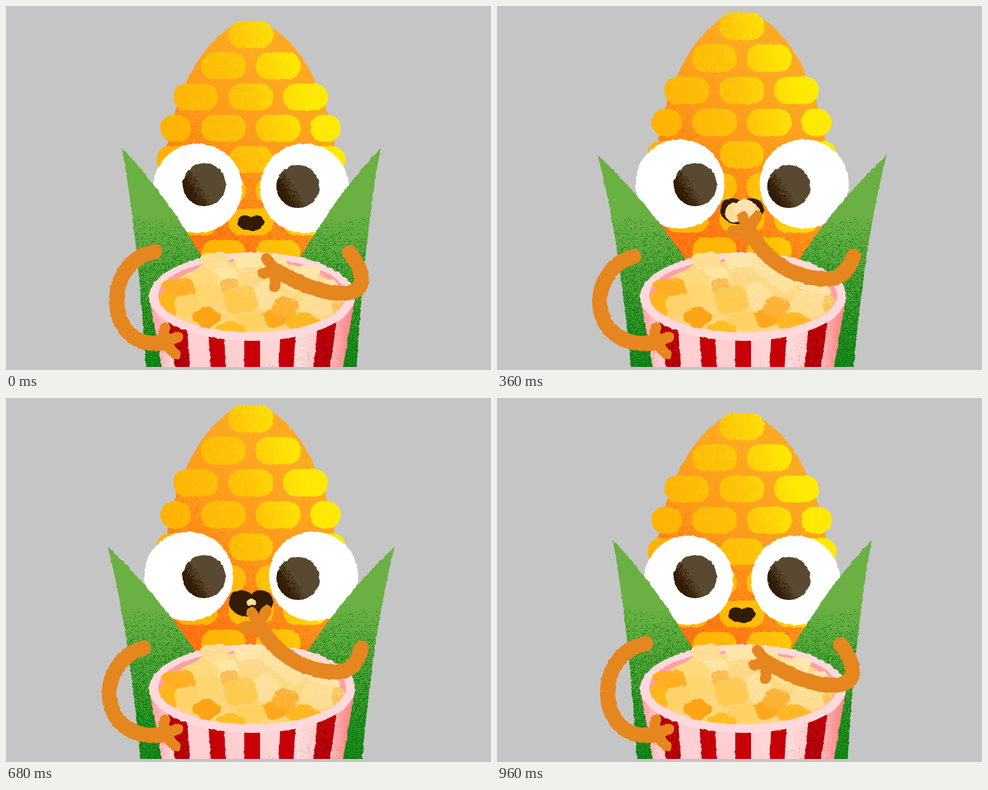
Recreate the animation shown at these times as an HTML page with a canvas. Size 800 by 600 pixels, loop 1000 ms.

```html
<!DOCTYPE html>
<html lang="en">
<head>
<meta charset="utf-8">
<title>Corn eating popcorn</title>
<style>
html, body { margin: 0; width: 100%; height: 100%; overflow: hidden; background: #c5c5c5; }
canvas { display: block; filter: url(#rough); }
body::after { content: ""; position: absolute; left: 0; top: 595px; width: 800px; height: 5px; background: #c5c5c5; }
svg { position: absolute; }
</style>
</head>
<body>
<svg width="0" height="0">
  <filter id="rough" filterUnits="userSpaceOnUse" x="0" y="0" width="800" height="600" color-interpolation-filters="sRGB">
    <feTurbulence type="fractalNoise" baseFrequency=".15" seed="4" stitchTiles="stitch" x="0" y="0" width="160" height="120"/>
    <feTile result="noise"/>
    <feDisplacementMap in="SourceGraphic" in2="noise" scale="4" xChannelSelector="R" yChannelSelector="G"/>
  </filter>
</svg>
<canvas width="800" height="600"></canvas>
<script>
const canvas = document.querySelector('canvas');
const ctx = canvas.getContext('2d');
const LOOP = 1000, STEP = 40;

const clamp = v => Math.max(0, Math.min(1, v));
const mix = (a, b, k) => a + (b - a) * k;
const mixAll = (a, b, k) => a.map((v, i) => mix(v, b[i], k));

let seed = 7;
const rand = () => (seed = (seed * 1664525 + 1013904223) >>> 0) / 4294967296;

// Speckle layer: a dot of the colour appears with probability density(x, y).
function grain(w, h, [r, g, b], density) {
  const c = document.createElement('canvas');
  c.width = w;
  c.height = h;
  const cx = c.getContext('2d'), img = cx.createImageData(w, h);
  for (let i = 0; i < w * h; i++) {
    const on = rand() < density(i % w, Math.floor(i / w));
    img.data.set([r, g, b, on ? 255 : 0], i * 4);
  }
  cx.putImageData(img, 0, 0);
  return ctx.createPattern(c, 'no-repeat');
}

function gradient(x0, y0, x1, y1, ...stops) {
  const g = ctx.createLinearGradient(x0, y0, x1, y1);
  stops.forEach(([at, color]) => g.addColorStop(at, color));
  return g;
}

function paint(path, ...styles) {
  for (const s of styles) {
    ctx.fillStyle = s;
    ctx.fill(path);
  }
}

function ellipse(x, y, rx, ry = rx) {
  const p = new Path2D();
  p.ellipse(x, y, rx, ry, 0, 0, 7);
  return p;
}

const bodyFill = gradient(290, 420, 500, 150, [0, '#ff7a14'], [.6, '#fe981a'], [1, '#fdaa22']);
const bodyGrain = grain(800, 600, [255, 98, 14], (x, y) => clamp((y - 210) / 420 + (360 - x) / 450) * .75);
const kernelFill = gradient(270, 260, 510, 200, [0, '#ffb205'], [.6, '#ffc008'], [.8, '#ffd406'], [1, '#ffea00']);
const kernelGrain = grain(800, 600, [255, 228, 20], (x, y) => clamp((x - 300) / 300 + (170 - y) / 500) * .3);
const leafFill = gradient(0, 340, 0, 600, [0, '#6bb043'], [.6, '#4a9f35'], [1, '#259026']);
const leafGrain = grain(800, 600, [12, 126, 16], (x, y) => clamp((y - 345) / 270) * .8);
const pupilGrain = grain(80, 80, [50, 28, 3], (x, y) => clamp((40 - x + .6 * (y - 40) - 3) / 28));
const cupFill = gradient(236, 0, 576, 0, [0, '#ff9fa3'], [.1, '#ffd0d3'], [.5, '#ffced1'],
  [.72, '#ffdcdc'], [.88, '#ffc0c0'], [.95, '#ff9292'], [1, '#ff8686']);
const cupGrain = grain(800, 600, [255, 128, 128], (x, y) =>
  clamp((x - 460) / 400 + (y - 570) / 250) * .5 + clamp((270 - x) / 90) * .5);
const stripeGrain = grain(800, 600, [130, 0, 14], (x, y) => clamp(Math.abs(x - 406) / 110 - .5) * clamp((y - 480) / 130) * .7);
const cornGrain = grain(800, 600, [255, 238, 184], (x, y) =>
  clamp(.22 + (x - 430) / 600 - (y - 460) / 170) * .6);

const body = new Path2D('M404 25C470 25 548 150 548 300V430H260V300C260 150 338 25 404 25');

// Kernel rows: pairs of centre x and width.
const kernels = new Path2D();
[
  [404, 74], [359, 74, 449, 74], [313, 74, 404, 74, 494, 74],
  [280, 50, 359, 74, 449, 74, 527, 50], [285, 74, 404, 72, 523, 74],
  [359, 74, 449, 74], [313, 74, 404, 74, 494, 74], [359, 74, 449, 74]
].forEach((row, j) => {
  for (let i = 0; i < row.length; i += 2)
    kernels.roundRect(row[i] - row[i + 1] / 2, 25 + 51.5 * j, row[i + 1], 44, 21);
});

const cup = new Path2D('M236 479L258 600H555L576 479Z');
const stripes = new Path2D('M264 500L280 600H304L296 500ZM331 500L338 600H362L359 500Z' +
  'M393 500V600H419V500ZM454 500L450 600H474L480 500ZM517 500L507 600H534L548 500Z');
const bowlClip = new Path2D('M252 380H560V477A154 61 0 0 1 252 477Z');

// Popcorn in the bowl: x, y, width, height, colour.
const pieces = [
  [500, 440, 38, 28, '#ffe3a4'], [345, 422, 54, 36, '#ffd98c'], [402, 422, 56, 30, '#ffe4a4'],
  [440, 428, 50, 40, '#ffdf9a'], [475, 450, 56, 42, '#ffdf98'], [525, 466, 54, 34, '#ffe0a4'],
  [360, 446, 52, 34, '#ffe49e'], [408, 444, 44, 32, '#ffd480'], [325, 450, 50, 42, '#ffd978'],
  [333, 474, 48, 40, '#ffd670'], [285, 465, 60, 36, '#ffaf26'], [369, 461, 34, 28, '#ffba4c'],
  [515, 490, 66, 44, '#ffdc90'], [548, 492, 24, 34, '#ffc050'], [427, 477, 50, 46, '#ffe09a'],
  [266, 494, 40, 44, '#ffb71c'], [387, 484, 62, 50, '#ffca50'], [300, 494, 48, 42, '#ffd26a'],
  [442, 515, 56, 30, '#ffa81e'], [461, 497, 46, 38, '#ffb134'], [405, 520, 54, 32, '#ffd162'],
  [331, 513, 46, 36, '#ffa414'], [490, 522, 58, 34, '#ffb824'], [370, 532, 48, 26, '#ffbf24']
];

function popcorn(x, y, w, h, color) {
  const p = ellipse(x, y, w * .42, h * .42);
  for (let i = 0; i < 4; i++) {
    const a = i * 1.571 + .6 + x % 1.5, ex = x + Math.cos(a) * w * .24, ey = y + Math.sin(a) * h * .22;
    p.addPath(ellipse(ex, ey, w * .27, h * .29));
  }
  paint(p, color, cornGrain);
}

function drawCorn(p) {
  ctx.save();
  ctx.translate(0, 540);
  ctx.scale(1, 1 + .029 * p);
  ctx.translate(0, -540);
  paint(body, bodyFill, bodyGrain);
  paint(kernels, kernelFill, kernelGrain);
  ctx.restore();
}

function drawEye(x, y, px, py) {
  paint(ellipse(x, y, 73.5), '#fff');
  ctx.save();
  ctx.translate(px - 40, py - 40);
  paint(ellipse(40, 40, 35.5), '#594930', pupilGrain);
  ctx.restore();
}

function drawMouth(p, q) {
  const m = new Path2D('M-1-.1C-1-1.1-.35-1.25 0-.75C.35-1.25 1-1.1 1-.1C1 .65 .5 1 0 1C-.5 1-1 .65-1-.1');
  ctx.save();
  ctx.translate(404, mix(358, 337, Math.min(p, q)));
  ctx.scale(mix(21.5, 37, q), mix(12.5, 22, q));
  paint(m, '#331c00');
  ctx.restore();
}

function drawLeaf(p) {
  const [x, y, ox, bx, ix, iy, ex] =
    mixAll([191, 234, 218, 231, 262, 308, 322], [165, 246, 201, 221, 242, 318, 307], p);
  paint(new Path2D(`M${x} ${y}Q${ox} 380 ${bx} 600H400L${ex} 412Q${ix} ${iy} ${x} ${y}`), leafFill, leafGrain);
}

function drawLeaves(p) {
  drawLeaf(p);
  ctx.save();
  ctx.translate(809, 0);
  ctx.scale(-1, 1);
  drawLeaf(p);
  ctx.restore();
}

function drawBucket() {
  paint(cup, cupFill, cupGrain);
  paint(stripes, '#c80008', stripeGrain);
  paint(ellipse(406, 479, 170, 73), '#ffd9dc');
  paint(ellipse(406, 477, 155, 61), '#ffa0a6');
  ctx.save();
  ctx.clip(bowlClip);
  paint(ellipse(406, 484, 146, 64), '#ffd67c', cornGrain);
  pieces.forEach(a => popcorn(...a));
  ctx.restore();
}

function stroke(path, width) {
  ctx.lineWidth = width;
  ctx.stroke(path);
}

function finger(x, y, dx, dy) {
  stroke(new Path2D(`M${x} ${y}l${dx} ${dy}`), 18);
}

function drawArms(p) {
  ctx.strokeStyle = '#e6861f';
  ctx.lineCap = ctx.lineJoin = 'round';

  const [sx, sy, cx, cy] = mixAll([245, 405, 160, 420], [225, 413, 146, 435], p);
  stroke(new Path2D(`M${sx} ${sy}C${cx} ${cy} ${cx} 565 256 556`), 25);
  [[3, -23], [24, -8], [21, 20]].forEach(f => finger(259, 554, ...f));

  const a = mixAll(
    [567, 407, 583, 425, 600, 467, 568, 472, 535, 478, 495, 465, 447, 437],
    [589, 413, 580, 433, 568, 449, 543, 449, 495, 449, 445, 425, 413, 366], p);
  stroke(new Path2D(`M${a[0]} ${a[1]}C${a.slice(2)}`), 25);
  const turn = 1.36 * p;
  [[-2.28, 27], [3.0, 23], [1.72, 26]].forEach(([angle, len]) =>
    finger(a[12], a[13], len * Math.cos(angle + turn), len * Math.sin(angle + turn)));
}

// Piece carried to the mouth, then swallowed.
function drawBite(t, p) {
  if (t < 180 || t > 720) return;
  const k = t < 500 ? p : 1;
  const s = t < 600 ? 1 - .15 * clamp((t - 360) / 240) : .85 * (1 - (t - 600) / 120);
  const x = 419 - 14 * k, y = t < 500 ? 422 - 88 * k : mix(355, 334, p);
  ctx.save();
  ctx.translate(x, y);
  ctx.scale(s, s);
  paint(ellipse(-13, 3, 16, 16), '#ffdc9c');
  paint(ellipse(13, 3, 15, 16), '#ffd68e');
  paint(ellipse(3, -2, 17, 17), '#ffe2ac');
  ctx.restore();
}

// Eased rise in the first half of the loop, mirrored in the second.
function pose(t) {
  t = (t + LOOP) % LOOP;
  const x = clamp(Math.min(t, LOOP - t) / 440);
  let lo = 0, hi = 1;
  for (let i = 0; i < 20; i++) {
    const s = (lo + hi) / 2, r = 1 - s;
    if (3 * s * r * r * .79 + 3 * s * s * r * .37 + s ** 3 < x) lo = s; else hi = s;
  }
  return lo * lo * (3 - 2 * lo);
}

const bump = (t, at) => Math.exp(-(((t - at) / 60) ** 2));

function draw(t) {
  const p = pose(t), q = pose(t - 30);
  const eyeY = 300.5 - 7.5 * p;
  const inward = bump(t, 245), outward = bump(t, 760);
  ctx.fillStyle = '#c5c5c5';
  ctx.fillRect(0, 0, 800, 600);
  drawCorn(p);
  drawEye(316 - 15.5 * q, eyeY, 327 + 3 * inward - 2 * outward, 294.5);
  drawEye(492.5 + 15.5 * q, eyeY, 481.5 - 5.5 * inward + 1.5 * outward, 297.5);
  drawMouth(p, q);
  drawLeaves(p);
  drawBucket();
  drawBite(t, p);
  drawArms(p);
}

let start, last;
function tick(now) {
  start ??= now;
  const t = Math.floor((now - start) % LOOP / STEP) * STEP;
  if (t !== last) draw(last = t);
  requestAnimationFrame(tick);
}
requestAnimationFrame(tick);
</script>
</body>
</html>
```
